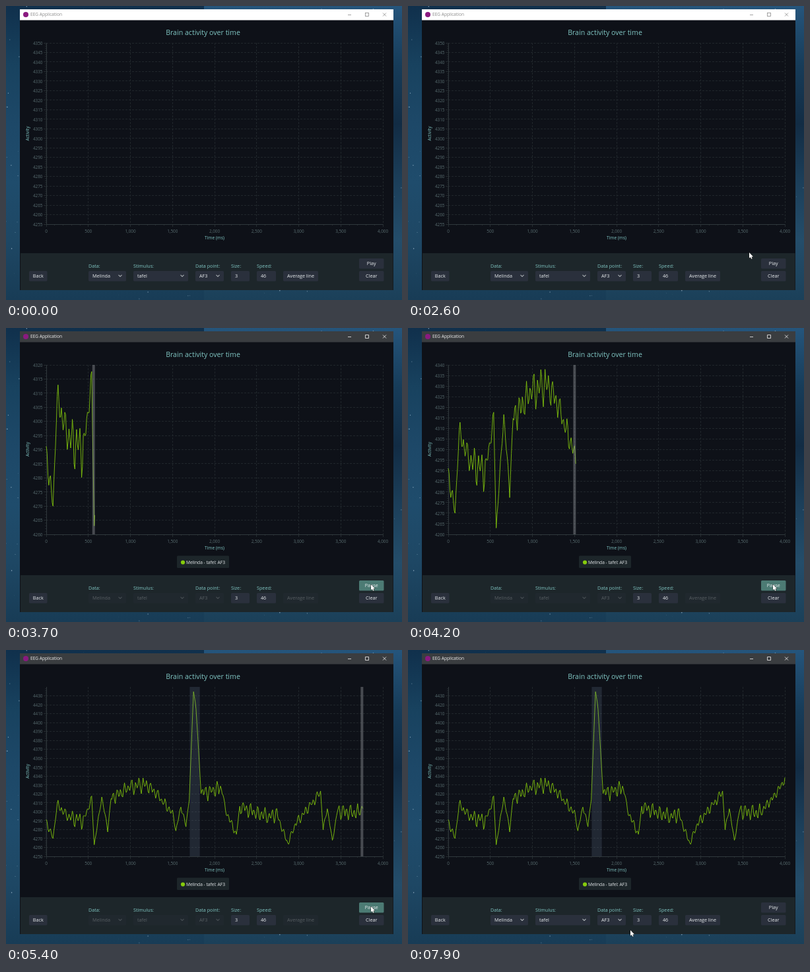
An HTML page with a canvas that plays this animation: 600 by 446 pixels, repeating every 8 s.

```html
<!DOCTYPE html>
<html lang="en">
<head>
<meta charset="utf-8">
<title>EEG Application</title>
<style>
html, body { margin: 0; width: 100%; height: 100%; overflow: hidden; background: #0c1a28; }
canvas { display: block; width: 600px; height: 446px; }
</style>
</head>
<body>
<canvas id="stage" width="600" height="446"></canvas>
<script>
const ctx = document.getElementById('stage').getContext('2d');
const LOOP = 8000, PLAY = 3400, SPEED = 1.876;
const LEFT = 61, RIGHT = 571, TOP = 56, SPAN = 4000, STEP = 10;
const TEAL = '#80c6c3', LIGHT = '#e8ecee', DIM = '#586c6f', GRID = '#20262b', AXIS = '#30383c';
const GREEN = '#86cc0c', PANEL = '#1d262a', BUTTON = '#2a303c';

// Turning points of the trend: ms, reading above 4200
const trend = [
  [0, 89], [80, 70], [130, 108], [260, 94], [440, 90], [540, 114.5], [570, 63], [660, 116],
  [730, 80], [770, 115], [1000, 128], [1170, 131], [1300, 122], [1510, 96], [1540, 78], [1600, 106],
  [1660, 84], [1700, 115], [1750, 235], [1780, 216], [1840, 121], [2090, 126], [2130, 102],
  [2260, 74], [2300, 106], [2640, 94], [2740, 97], [2870, 64], [2960, 86], [3260, 122], [3290, 80],
  [3340, 104], [3400, 67], [3460, 101], [3700, 98], [3860, 116], [4000, 136]
];

// Pointer tip: ms, x, y
const path = [
  [500, 592, 446], [1300, 543, 392], [1900, 543, 392], [2500, 517, 374],
  [2800, 517, 374], [3200, 553, 389], [6900, 553, 389], [7800, 337, 425]
];

let seed = 7;
const rand = () => (seed = seed * 16807 % 2147483647) / 2147483647;
const wave = (ms, peak, period) => Math.cos(2 * Math.PI * (ms - peak) / period);

// The ripple fades where the trend is steep
const signal = Array.from({ length: SPAN / STEP + 1 }, (_, i) => {
  const ms = i * STEP, k = Math.max(1, trend.findIndex(p => p[0] >= ms));
  const [[t0, v0], [t1, v1]] = [trend[k - 1], trend[k]];
  const slope = (v1 - v0) / (t1 - t0);
  const ripple = 7 * wave(ms, 533, 44) + 4 * wave(ms, 1012, 79) + 3 * (rand() - .5);
  return 4200 + v0 + slope * (ms - t0) + ripple / (1 + 6 * Math.abs(slope));
});
const stars = Array.from({ length: 260 }, () => [rand() * 600, rand() * 446, rand()]);

const xOf = ms => LEFT + ms / SPAN * (RIGHT - LEFT);

function rect(x, y, w, h, color) {
  ctx.fillStyle = color;
  ctx.fillRect(x, y, w, h);
}

function box(x, y, w, h, color, r = 1.5) {
  ctx.fillStyle = color;
  ctx.beginPath();
  ctx.roundRect(x, y, w, h, r);
  ctx.fill();
}

function text(s, x, y, size, color, align = 'left') {
  ctx.font = size + 'px "Open Sans", "Noto Sans", sans-serif';
  ctx.textAlign = align;
  ctx.fillStyle = color;
  ctx.fillText(s, x, y + size * .36);
}

function line(points, color, width = 1, dash = []) {
  ctx.strokeStyle = color;
  ctx.lineWidth = width;
  ctx.setLineDash(dash);
  ctx.beginPath();
  points.forEach(([x, y]) => ctx.lineTo(x, y));
  ctx.stroke();
  ctx.setLineDash([]);
}

function dot(x, y, r, color) {
  ctx.fillStyle = color;
  ctx.beginPath();
  ctx.arc(x, y, r, 0, 7);
  ctx.fill();
}

function sky(x, colors) {
  const g = ctx.createLinearGradient(0, 0, 0, 446);
  colors.forEach((c, i) => g.addColorStop(i / (colors.length - 1), c));
  rect(x, 0, 300, 446, g);
}

function drawDesktop() {
  sky(0, ['#10304c', '#18425f', '#1d4868', '#1f4c6c', '#1e4764', '#183c56']);
  sky(300, ['#25557c', '#173c59', '#122c44', '#1c3f5a', '#244d6a', '#1b4059']);
  for (const [x, y, b] of stars) dot(x, y, .3 + b * .5, `rgba(190,215,235,${b * .8})`);
}

function drawWindow(active) {
  const ink = active ? '#f2f2f2' : '#8b8b8b';
  rect(21, 5, 566, 426, '#0e1118');
  rect(21, 5, 566, 16.5, active ? '#3a3d40' : '#ffffff');
  rect(22, 375, 564.5, 56, PANEL);
  dot(30, 13, 4, '#8a1a80');
  text('EEG Application', 37, 13, 6.55, ink);
  line([[518, 13.5], [523, 13.5]], ink, .8);
  ctx.strokeRect(544.5, 10.5, 5, 5);
  line([[571, 10.5], [576, 15.5]], ink, .8);
  line([[576, 10.5], [571, 15.5]], ink, .8);
  text('Brain activity over time', 298.5, 40, 10.6, TEAL, 'center');
}

function axisRange(points) {
  if (!points) return { lo: 4255, hi: 4350, step: 5 };
  const min = Math.min(...points), max = Math.max(...points);
  const pad = Math.max(.5, (max - min) * .02);
  for (const step of [.25, .5, 1, 2.5, 5, 10]) {
    const lo = Math.floor((min - pad) / step) * step;
    const hi = Math.ceil((max + pad) / step) * step;
    if ((hi - lo) / step <= 19) return { lo, hi, step };
  }
}

function drawAxes({ lo, hi, step }, yOf, bottom) {
  const snap = v => Math.floor(v) + .5;
  const top = step < 10 ? hi : hi - step;
  for (let v = lo; v <= top; v += step) {
    const y = snap(yOf(v));
    if (v > lo) line([[LEFT, y], [RIGHT, y]], GRID, 1, [3, 2]);
    line([[LEFT - 4, y], [LEFT, y]], AXIS, .7);
    for (let j = 1; j < 5 && v < hi; j++) {
      const m = yOf(v + step * j / 5);
      line([[LEFT - 2, m], [LEFT, m]], AXIS, .6);
    }
    text(String(v), 55.5, yOf(v) + .5, 6.4, DIM, 'right');
  }
  for (let ms = 0; ms <= SPAN; ms += 100) {
    const major = ms % 500 === 0, x = snap(xOf(ms));
    line([[x, bottom], [x, bottom + (major ? 4 : 2)]], AXIS, .7);
    if (!major) continue;
    line([[x, TOP], [x, bottom]], GRID, 1, [3, 2]);
    text(ms.toLocaleString('en-US'), xOf(ms), bottom + 11, 6.4, DIM, 'center');
  }
  line([[LEFT + .5, TOP], [LEFT + .5, bottom + .5], [RIGHT, bottom + .5]], AXIS);
  text('Time (ms)', 316, bottom + 20.5, 6.6, TEAL, 'center');
  ctx.save();
  ctx.translate(33, (TOP + bottom) / 2 + (bottom > 320 ? 0 : -.5));
  ctx.rotate(-Math.PI / 2);
  text('Activity', 0, 0, 6.6, TEAL, 'center');
  ctx.restore();
}

function drawChart(progress) {
  const bottom = progress ? 313 : 331;
  let points = null;
  if (progress) {
    const at = progress / STEP, k = Math.floor(at);
    points = signal.slice(0, k + 1);
    if (k < signal.length - 1) points.push(signal[k] + (signal[k + 1] - signal[k]) * (at - k));
  }
  const range = axisRange(points);
  const yOf = v => bottom - (v - range.lo) / (range.hi - range.lo) * (bottom - TOP);
  drawAxes(range, yOf, bottom);
  if (!progress) return;

  ctx.lineJoin = 'round';
  line(points.map((v, i) => [xOf(Math.min(i * STEP, progress)), yOf(v)]), GREEN, .85);
  if (progress > 1705) {
    const x = xOf(1705);
    rect(x, TOP, xOf(Math.min(progress, 1825)) - x, bottom - TOP, 'rgba(110,130,160,.2)');
  }
  if (progress < SPAN) rect(xOf(progress) - 3.7, TOP, 4, bottom - TOP, 'rgba(140,145,150,.45)');
  box(259, 345.5, 79, 18.5, PANEL);
  dot(268, 355.5, 3.1, GREEN);
  text('Melinda - tafel: AF3', 273, 355.5, 6.63, LIGHT);
}

function button(label, x, y, w, hover) {
  box(x, y, w, 15.5, hover ? '#4c7b74' : BUTTON);
  text(label, x + w / 2, y + 7.5, 7.2, LIGHT, 'center');
}

function field(value, x, w, combo) {
  box(x, 402, w, 15.5, BUTTON);
  text(value, x + 6, 409.5, 7.2, LIGHT);
  const cx = x + w - 9;
  if (combo) line([[cx - 2.5, 408], [cx, 410.5], [cx + 2.5, 408]], '#a0a6aa', 1.1);
}

function drawControls(playing, mouse) {
  const over = y => !!mouse && mouse[0] >= 535 && mouse[0] <= 572 && mouse[1] >= y && mouse[1] <= y + 16;
  const labels = [['Data:', 125], ['Stimulus:', 193], ['Data point:', 287], ['Size:', 341], ['Speed:', 380]];
  for (const [s, x] of labels) text(s, x, 394, 7.2, TEAL);
  button('Back', 35, 402, 27.5);
  ctx.globalAlpha = playing ? .28 : 1;
  field('Melinda', 125, 57, true);
  field('tafel', 193, 83, true);
  field('AF3', 287, 43, true);
  button('Average line', 420, 402, 53);
  ctx.globalAlpha = 1;
  field('3', 341, 28);
  field('46', 380, 29);
  button(playing ? 'Pause' : 'Play', 535, 383, 37.5, over(383));
  button('Clear', 535, 402, 37.5, over(402));
}

function pointerAt(t) {
  if (t < path[0][0]) return null;
  const i = path.findIndex(p => p[0] > t);
  if (i < 0) return path[path.length - 1].slice(1);
  const [a, b] = [path[i - 1], path[i]];
  let u = (t - a[0]) / (b[0] - a[0]);
  u = u * u * (3 - 2 * u);
  return [a[1] + (b[1] - a[1]) * u, a[2] + (b[2] - a[2]) * u];
}

function drawPointer([x, y]) {
  ctx.beginPath();
  for (const [dx, dy] of [[0, 0], [0, 8.6], [1.9, 6.9], [3.2, 9.8], [4.6, 9.2], [3.4, 6.4], [6, 6.2]])
    ctx.lineTo(x + dx, y + dy);
  ctx.closePath();
  ctx.fillStyle = '#fff';
  ctx.strokeStyle = '#111';
  ctx.lineWidth = .8;
  ctx.stroke();
  ctx.fill();
}

function draw(now) {
  const t = Math.floor(now % LOOP / 100) * 100;
  const active = t >= PLAY;
  const progress = active ? Math.min(SPAN, 576 + (t - 3700) * SPEED) : 0;
  const mouse = pointerAt(t);
  drawDesktop();
  drawWindow(active);
  drawChart(progress);
  drawControls(active && progress < SPAN, mouse);
  if (t >= 6300 && t < 6900) {
    box(558, 395, 60, 16, '#0b0c0f', 2);
    text('Add data to the chart', 562.5, 402, 6.1, LIGHT);
  }
  if (mouse) drawPointer(mouse);
}

const start = performance.now();
function tick() {
  draw(performance.now() - start);
  requestAnimationFrame(tick);
}
tick();
</script>
</body>
</html>
```
